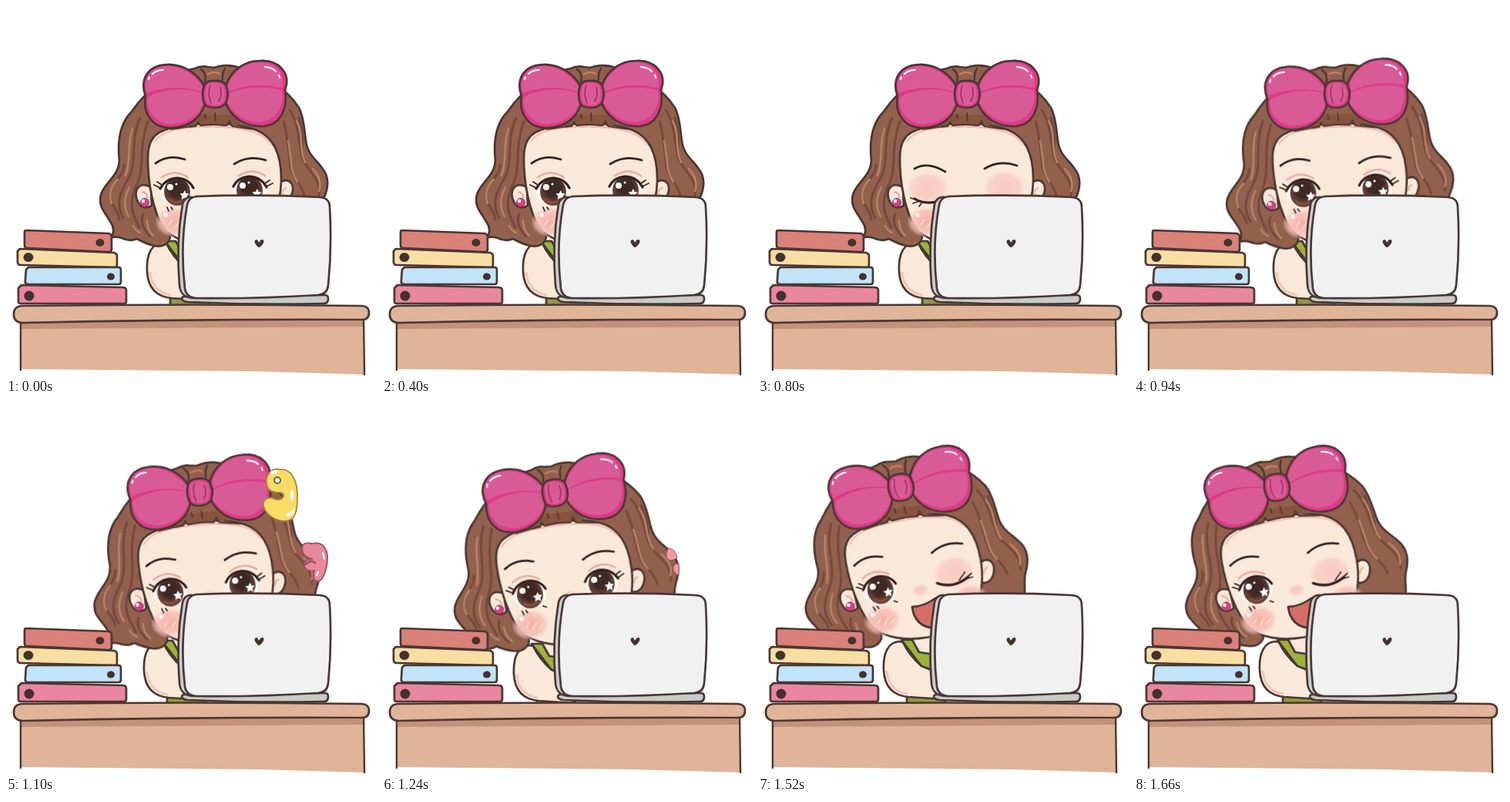
These frames come from a looping animation (480x480 px, 1.8 s). An HTML page:

```html
<!DOCTYPE html>
<html lang="en">
<head>
<meta charset="utf-8">
<title>Girl at a laptop</title>
<style>
html, body { margin: 0; width: 100%; height: 100%; overflow: hidden; background: #fff; }
svg { display: block; width: 100vw; height: 100vh; }

.ink { stroke: #4a3732; stroke-width: 2.7; stroke-linejoin: round; stroke-linecap: round; }
.line { fill: none; stroke: #4a3732; stroke-width: 2.4; stroke-linecap: round; stroke-linejoin: round; }
.dark { stroke: #75493c; stroke-width: 3; }
.light { stroke: #b98367; stroke-width: 2.5; }
.skin { fill: #fae8d9; }
.pink { fill: #d95b96; }
.hot { fill: #de3a88; }
.lash { fill: none; stroke: #34221f; stroke-width: 3.2; stroke-linecap: round; }
.thin { stroke-width: 1.7; }
.brow { stroke-width: 2.8; }
.white { fill: none; stroke: #fff; stroke-width: 2.2; stroke-linecap: round; }

.head, .hair, .body, .show { animation: 1.8s step-end infinite; }
.head { animation-name: head; }
.hair { animation-name: hair; }
.body { animation-name: body; }
.open { animation-name: open; }
.open-right { animation-name: open-right; }
.shut { animation-name: shut; }
.wink { animation-name: wink; }
.lids { animation-name: lids; }
.ooh { animation-name: ooh; }
.laugh { animation-name: laugh; }
.toys { animation-name: toys; }
.bits { animation-name: bits; }

@keyframes head {
  0% { transform: translate(270px, 114px); }
  52.22% { transform: translate(262px, 114px) rotate(-2.5deg); }
  61.11% { transform: translate(250px, 114px) rotate(-5deg); }
  68.88% { transform: translate(223px, 115px) rotate(-7.5deg); }
  76.66%, 100% { transform: translate(184px, 108px) rotate(-10deg); }
}
@keyframes hair {
  0% { transform: none; }
  92.22%, 100% { transform: skewX(2.4deg); }
}
@keyframes body {
  0% { transform: none; }
  52.22% { transform: translate(-2px, 0); }
  61.11% { transform: translate(-4px, 2px); }
  68.88% { transform: translate(-12px, 6px); }
  76.66%, 100% { transform: translate(-20px, 1px); }
}
@keyframes open { 0%, 52.22%, 100% { opacity: 1; } 44.44% { opacity: 0; } }
@keyframes open-right { 0%, 52.22% { opacity: 1; } 44.44%, 76.66%, 100% { opacity: 0; } }
@keyframes shut { 0%, 52.22%, 100% { opacity: 0; } 44.44% { opacity: 1; } }
@keyframes wink { 0% { opacity: 0; } 76.66%, 100% { opacity: 1; } }
@keyframes lids { 0%, 52.22% { opacity: 0; } 44.44%, 76.66%, 100% { opacity: 1; } }
@keyframes ooh { 0%, 84.44%, 100% { opacity: 0; } 76.66% { opacity: 1; } }
@keyframes laugh { 0% { opacity: 0; } 84.44%, 100% { opacity: 1; } }
@keyframes toys { 0%, 68.88%, 100% { opacity: 0; } 61.11% { opacity: 1; } }
@keyframes bits { 0%, 76.66%, 100% { opacity: 0; } 68.88% { opacity: 1; } }
</style>
</head>
<body>
<svg viewBox="0 0 480 480">
  <defs>
    <radialGradient id="blush">
      <stop offset="0" stop-color="#f5b0aa"/>
      <stop offset=".7" stop-color="#f7c0b8" stop-opacity=".85"/>
      <stop offset="1" stop-color="#f9d6ca" stop-opacity="0"/>
    </radialGradient>
    <radialGradient id="shade">
      <stop offset="0" stop-color="#f8c8bf"/>
      <stop offset=".75" stop-color="#f9d0c6" stop-opacity=".9"/>
      <stop offset="1" stop-color="#fae0d2" stop-opacity="0"/>
    </radialGradient>
    <radialGradient id="iris" cy=".38">
      <stop offset=".55" stop-color="#3e2823"/>
      <stop offset="1" stop-color="#6c4236"/>
    </radialGradient>
    <g id="eye">
      <ellipse cx="222" cy="242" rx="21" ry="17" fill="#fff"/>
      <ellipse cx="222" cy="241" rx="17" ry="18" fill="url(#iris)"/>
      <path d="M212 251q9 7 18 1" fill="none" stroke="#85533f" stroke-width="2.5"/>
      <circle cx="213" cy="235" r="4" fill="#fff"/>
      <circle cx="221" cy="231" r="1.5" fill="#fff"/>
      <path d="M232 239l1.6 4 4 .6-3 3 .7 4.4-3.8-2-3.8 2 .7-4.4-3-3 4.4-.6z" fill="#fff"/>
    </g>
    <g id="lid">
      <path d="M201 223q18-13 36 0" fill="none" stroke="#e9aaa4" stroke-width="2.5"/>
      <path class="lash" d="M200 237q7-13 22-14 15 1 21 13"/>
      <path class="lash thin" d="M200 236l-8-4M202 232l-6-4"/>
    </g>
  </defs>

  <!-- body -->
  <g class="body">
    <path d="M213 376h50v14h-50z" fill="#8f9c3f" class="ink"/>
    <path class="skin" d="M214 295l10 26 38 5v-30z"/>
    <path d="M206 305l14 0 9 16 33 5v24l-30-11z" fill="#9ab33c" class="ink"/>
    <path class="skin ink" d="M203 307c-14 1-21 15-20 37 1 20 11 33 32 35l45 3v-32l-28-11q-16-14-24-31z"/>
    <path d="M187 345c1 16 10 28 27 30" fill="none" stroke="#f1c5b5" stroke-width="3"/>
  </g>

  <!-- head, laid out around the bow's knot -->
  <g class="head"><g transform="translate(-270 -114)">
    <g transform="translate(270 114)"><g class="hair"><g transform="translate(-270 -114)">
      <path fill="#92604d" class="ink" d="M245 81Q253 77 262 79L270 80 277 78Q290 76 300 79C335 88 365 108 380 132 387 145 387 162 389 175 391 192 402 199 410 210 420 222 419 235 412 250 405 265 410 275 400 288 390 298 372 300 360 285L335 260 215 290 212 304Q205 314 192 311 180 308 170 302 160 306 150 301 140 298 133 302 142 296 138 285C130 268 119 262 123 245 128 228 146 222 147 200 144 172 150 150 163 137 185 105 215 86 245 81Z"/>
      <path class="line dark" d="M174 145c-14 30-2 58-17 82-11 18-14 31-5 48M184 150c-13 36-3 59-15 84-11 23-4 37 4 54M153 206c1 15-18 23-18 41 0 12 12 19 12 30M178 270q-6 13 9 29M368 135c16 25 9 49 19 68 11 17 21 23 19 43M360 150c10 34 4 54 14 73 9 10 12 17 14 26M380 145q6 20 5 38"/>
      <path class="line light" d="M164 159c-8 25-1 41-9 61M160 235c-8 16-7 27-1 38M183 278c0 9 3 16 8 20M145 225q-14 14-8 31M377 149c10 20 2 35 11 54M366 175c5 25 2 40 12 53M398 211q13 15 8 29M165 285q4 8 9 9"/>
      <path class="line" d="M253 82q8 6 5 17M284 81q-4 7-3 15"/>
      <path class="line light" d="M262 88q8-4 15 0"/>
    </g></g></g>

    <path class="skin ink" d="M188 235c-16-9-24 6-17 19 4 8 11 9 18 5z"/>
    <path class="skin ink" d="M355 229c13-8 21 3 15 17-4 9-12 11-17 8z"/>
    <path d="M176 241q6 0 8 8M364 236q-5 1-6 8" fill="none" stroke="#e6a99d" stroke-width="2"/>
    <path class="skin ink" d="M184 198c0-22 7-34 28-39 28-8 83-10 113 2 24 10 32 34 32 63 0 20-4 40-16 60-18 22-48 28-69 28-31 0-56-10-68-25-13-20-20-58-20-89z"/>
    <path d="M193 176q8-11 21-14c28-7 82-8 109 2q14 5 21 16" fill="none" stroke="#efbcae" stroke-width="2.2"/>
    <path fill="#86543f" d="M238 141h70l-5 13-10 2-2-7-4 7q-17-2-34 0l-3-6-3 7-10 1z"/>
    <path class="line" d="M214 160l33-5 2-5 3 5q18-2 34 0l4-6 3 7 28 4" style="stroke-width:1.8"/>
    <path class="line thin" d="M271 139l1 10M258 140l1 6"/>

    <!-- blush -->
    <ellipse cx="218" cy="280" rx="25" ry="20" fill="url(#blush)"/>
    <ellipse cx="335" cy="272" rx="23" ry="19" fill="url(#blush)"/>
    <ellipse cx="273" cy="250" rx="11" ry="8" fill="url(#shade)"/>
    <circle cx="207" cy="271" r="2.6" fill="#fff"/>
    <path d="M211 284l5-7M219 287l7-9M229 286l5-6" fill="none" stroke="#fbe3b9" stroke-width="1.8"/>

    <!-- eyes and brows -->
    <g class="show open">
      <use href="#eye"/><use href="#lid"/>
      <path class="lash thin" d="M209 261l2 5M214 261l2 3M237 258l4 2"/>
      <path class="lash brow" d="M194 204q17-12 38-5M296 205q19-12 41-5"/>
    </g>
    <g class="show open-right">
      <use href="#eye" x="94" y="-2"/>
      <use href="#lid" transform="matrix(-1 0 0 1 538 -2)"/>
    </g>
    <ellipse class="show lids" cx="320" cy="235" rx="28" ry="22" fill="url(#shade)"/>
    <g class="show shut">
      <ellipse cx="220" cy="236" rx="28" ry="21" fill="url(#shade)"/>
      <path class="lash brow" d="M203 211q17-10 40 4M294 211q19-12 42-4"/>
      <path class="lash" d="M203 250q14 9 36 2"/>
      <path class="lash thin" d="M204 251l-6-2M207 254l-6 2M212 256l-3 4"/>
    </g>
    <g class="show wink">
      <path class="lash" d="M296 245q20 11 41-1"/>
      <path class="lash thin" d="M325 246l9-9M331 247l11-7M334 246l9-1"/>
    </g>
    <circle cx="180" cy="255" r="5.5" fill="#dc3e89" stroke="#8b3458"/>
    <circle cx="178" cy="253" r="2.3" fill="#fff"/>

    <!-- bow -->
    <path class="hot ink" d="M257 103C246 85 228 75 208 76 184 77 173 95 181 117 177 140 190 159 215 158 238 157 253 145 258 127Z"/>
    <path class="pink" d="M256 106C244 88 226 78 208 78 187 79 177 95 183 113 205 104 235 104 255 112ZM255 113C232 105 205 107 184 118 181 136 195 153 215 153 237 152 250 142 256 126Z"/>
    <path class="hot ink" d="M285 103C293 82 310 71 330 71 355 70 370 88 362 109 366 135 355 155 333 156 308 157 292 143 285 126Z"/>
    <path class="pink" d="M287 105C295 85 311 73 328 73 350 72 362 88 358 106 332 100 308 102 287 112ZM287 114C308 105 335 103 358 110 361 132 350 148 332 150 312 152 296 141 287 126Z"/>
    <path class="hot ink" d="M257 103q4-7 14-6 11-1 15 7 4 12-1 22-5 6-14 6-11 0-14-6-4-12 0-23z"/>
    <path class="pink" d="M260 103q10-7 22 1 4 11-1 22-10 5-20 0-4-11-1-23z"/>
    <path class="line" d="M265 103q-4 12 1 23M278 106q3 9-2 18" style="stroke:#a32d64;stroke-width:1.6"/>
    <path class="white" d="M185 95l1-3M190 88q5-5 14-5M336 79q10 1 14 6M354 90l1 3"/>
  </g></g>

  <!-- mouths, in the tilted pose -->
  <path class="show ooh ink" fill="#d66e68" d="M218 260c-5 0-7 7-6 14 1 7 5 12 10 11 4-2 4-9 3-15q-2-9-7-10z"/>
  <path class="show laugh ink" fill="#d66e68" d="M200 263q15 0 30-11v39c-19-1-28-11-30-28z"/>

  <g class="show toys">
    <path fill="#f8dc65" stroke="#a38638" stroke-width="1.8" d="M341 90c-6 8-4 22 6 24 7 2 13-1 13 4 0 5-6 8-12 5-9-4-15 2-14 9 2 10 13 19 27 20 16 0 17-16 17-32 0-23-9-36-22-35-7-2-12 1-15 5z"/>
    <circle cx="352" cy="99" r="4" fill="#fff" stroke="#725e34" stroke-width="2"/>
    <path class="white" d="M371 114v9M366 144q5-1 6-5M345 89l5-1" style="stroke-width:4"/>
    <path fill="#e8899c" stroke="#985363" stroke-width="1.8" d="M386 182c5-4 8 0 13-1 11-3 18 7 18 18 0 13-5 30-12 31-7 0-7-9-5-14-7 2-14-2-13-9 1-5 6-6 11-6-6-1-11-3-13-9q-2-6 1-10z"/>
    <path class="line" d="M389 208q6-7 12-2" style="stroke:#985363"/>
    <path class="white" d="M411 193l2 8M403 222l2-4"/>
  </g>
  <g class="show bits" fill="#ee9ba5" stroke="#9b5960">
    <path d="M372 187q8 1 11 12-6 6-13 2-3-8 2-14z"/>
    <path d="M385 207q-8 0-7 7 2 7 7 8z"/>
  </g>

  <!-- books -->
  <g class="ink">
    <path fill="#da8179" d="M26 291l107 4q4 1 4 5v16q0 3-4 3l-106-5q-3 0-3-4v-16q0-3 2-3z"/>
    <path fill="#f8dea3" d="M18 315l122 5q4 1 4 4v12q0 3-3 3l-122-3q-4 0-4-4v-14z"/>
    <path fill="#c1e4f8" d="M29 339l117 0q3 0 3 3v16q0 3-3 3l-118 0q-4-1-3-5l1-14z"/>
    <path fill="#e986a2" d="M20 362l131 3q5 0 5 4v14q0 3-3 3h-134q-3 0-3-3v-17z"/>
  </g>
  <g fill="#44322f">
    <ellipse cx="122" cy="307" rx="5.5" ry="5"/>
    <ellipse cx="29" cy="326" rx="6.5" ry="6"/>
    <ellipse cx="136" cy="351" rx="5" ry="4.5"/>
    <ellipse cx="30" cy="376" rx="6.5" ry="6.5"/>
  </g>

  <!-- desk -->
  <path fill="#dfb498" d="M19 405h445v73l-140-4-305-3z"/>
  <path fill="#c49278" d="M20 409h443v7l-443 3z"/>
  <path class="line" d="M19 410v62M464 407l1 71"/>
  <path fill="#dfb498" class="ink" d="M20 389q222-3 442 0 9 1 9 9 0 9-10 9-220-1-440 4-11-1-11-11 0-10 10-11z"/>

  <!-- laptop -->
  <path fill="#c9cac9" class="ink" d="M230 377l184-2q4 0 4 5 0 6-6 6-89 2-177-2-6-1-7-4 0-2 2-3z"/>
  <path fill="#cdcfd0" class="ink" d="M242 248q-10-1-13 9c-5 30-7 70-4 105 1 11 6 16 17 17z"/>
  <path fill="#f1f1f2" class="ink" d="M247 247q80-3 160 1 13 1 13 13 3 52-2 101-1 12-13 13-80 5-157 4-14 0-16-13c-4-35-3-75 3-108q2-10 12-11z"/>
  <path fill="#44302e" d="M328 313.500q-5.500-4.500-5.500-8 1-3.500 3.500-2l2 3.500 2.500-3.500q4-1.500 4 2-1 4.500-6.500 8z"/>
</svg>
</body>
</html>
```
